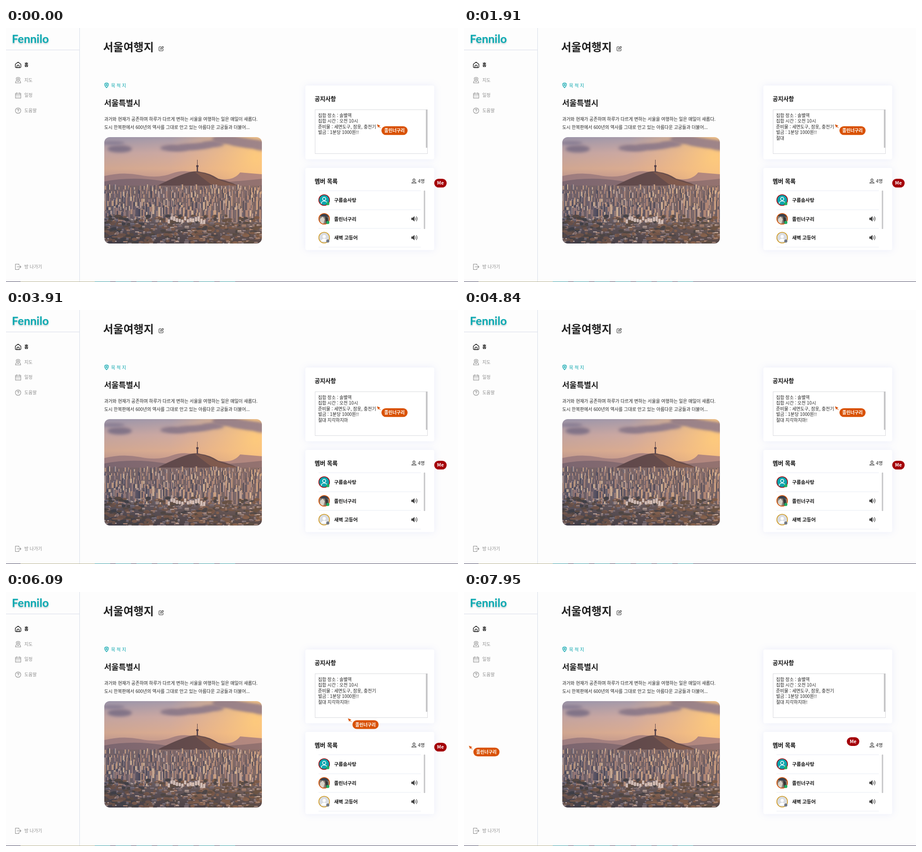
An HTML page with a canvas for the animation above (8 s loop, 998x561 px).

```html
<!DOCTYPE html>
<html lang="ko">
<head>
<meta charset="utf-8">
<style>
  html, body { margin: 0; width: 100%; height: 100%; overflow: hidden; background: #fdfdfd; }
  canvas { position: absolute; left: 217px; top: 241px; border-radius: 12px; }
  svg { position: absolute; left: 0; top: 0; }
  text { font: 9.85px "Noto Sans CJK KR", "Noto Sans CJK", sans-serif; fill: #222; white-space: pre; }
  .nav { font-size: 9.9px; fill: #8c8c8c; font-weight: 500; }
  .head { font-size: 12.8px; font-weight: 700; fill: #111; }
  .name { font-size: 10.65px; font-weight: 700; fill: #111; }
  .tag { font-size: 9.8px; font-weight: 700; fill: #fff; }
  .line { fill: none; stroke: #8c8c8c; stroke-width: 1.1; stroke-linecap: round; stroke-linejoin: round; }
  .card { fill: #fff; filter: drop-shadow(0 0 8px rgba(95, 115, 230, .12)); }
  .bar { fill: #c6c6c8; }
</style>
</head>
<body>
<canvas id="photo" width="348" height="235"></canvas>
<svg width="998" height="561" viewBox="0 0 998 561">
  <defs>
    <g id="person"><circle cy="-2.6" r="3.5"/><path d="M-6.8 8.5C-6.5 0 6.5 0 6.8 8.5"/></g>
    <g id="speaker">
      <path d="M0 -2.5h3L7 -6V6L3 2.5H0Z" fill="#444"/>
      <path class="line" style="stroke:#444" d="M9 -2.5Q11 0 9 2.5M11 -4.8Q15 0 11 4.8"/>
    </g>
    <clipPath id="face"><circle r="11.6"/></clipPath>
  </defs>

  <!-- sidebar -->
  <path d="M162.5 0V560M0 48.5H162" stroke="#d8dde8"/>
  <text x="13" y="32.5" style="font:700 25px Lato,sans-serif;fill:#08a9b1;filter:drop-shadow(0 2px 1.5px rgba(0,80,90,.3))">Fennilo</text>
  <g class="line">
    <path style="stroke:#111;stroke-width:1.3" d="M23.5 87.5h-1.2a1.7 1.7 0 0 1-1.7-1.7V80L26.7 75.3 32.8 80v5.8a1.7 1.7 0 0 1-1.7 1.7H30M24.3 87.5V84.3a2.4 2.4 0 0 1 4.8 0V87.5Z"/>
    <path d="M26.7 118.5C19.5 111.5 23 109 26.7 109S33.9 111.5 26.7 118.5ZM22.5 116.5L20.8 121.3H32.6L31 116.5"/>
    <circle cx="26.7" cy="112.7" r="1.4"/>
    <path d="M21 144.2H32.6V155H21ZM21 147.5H32.6M23.7 142.8V145.3M29.9 142.8V145.3"/>
    <path stroke-dasharray=".2 2.6" d="M23.6 150H31M23.6 152.5H31"/>
    <circle cx="26.7" cy="182.5" r="6"/>
    <path d="M24.9 181C24.9 178.5 28.6 178.6 28.6 180.9 28.6 182.4 26.7 182.2 26.7 183.7M26.7 185.7V185.8"/>
    <path d="M28.5 524V521.5H20.8V533.5H28.5V531M24.5 527.5H33M30.4 524.9L33 527.5 30.4 530.1"/>
  </g>
  <text class="nav" x="40.5" y="85" style="fill:#111;font-weight:700">홈</text>
  <text class="nav" x="40.5" y="118.5">지도</text>
  <text class="nav" x="40.5" y="152.3">일정</text>
  <text class="nav" x="40.5" y="186">도움말</text>
  <text class="nav" x="40.5" y="531">방 나가기</text>

  <!-- destination -->
  <text x="214.5" y="50.6" style="font-size:24.3px;font-weight:700">서울여행지</text>
  <path class="line" style="stroke:#333" d="M342.5 41.5H339a1.2 1.2 0 0 0-1.2 1.2V49.3a1.2 1.2 0 0 0 1.2 1.2H345.6a1.2 1.2 0 0 0 1.2-1.2V46M341.2 47.2L341.6 45 346 40.6 347.8 42.4 343.4 46.8Z"/>
  <g class="line" style="stroke:#08a5ad;stroke-width:1.3">
    <path d="M222 132C215 125 218 121.5 222 121.5S229 125 222 132Z"/><circle cx="222" cy="125.7" r="1.6"/>
  </g>
  <text x="232" y="130.5" style="font-size:10px;font-weight:500;fill:#08a5ad">목 적 지</text>
  <text x="216.8" y="171.6" style="font-size:17.4px;font-weight:700">서울특별시</text>
  <text x="217" y="205.2">과거와 현재가 공존하며 하루가 다르게 변하는 서울을 여행하는 일은 매일이 새롭다.</text>
  <text x="217" y="223.2">도시 한복판에서 600년의 역사를 그대로 안고 있는 아름다운 고궁들과 더불어...</text>

  <!-- notice -->
  <rect class="card" x="661" y="127" width="284.5" height="163" rx="4"/>
  <text class="head" x="681.5" y="160.8">공지사항</text>
  <rect x="682.5" y="180.5" width="248" height="97" fill="#fff" stroke="#d9dade"/>
  <rect class="bar" x="927" y="180" width="3.5" height="84.5"/>
  <text x="689" y="196.8">집합 장소 : 솔별역</text>
  <text x="689" y="209.3">집합 시간 : 오전 10시</text>
  <text x="689" y="221.8">준비물 : 세면도구, 잠옷, 충전기</text>
  <text x="689" y="234.3">벌금 : 1분당 1000원!!</text>
  <text x="689" y="246.8" id="typed"></text>

  <!-- members -->
  <rect class="card" x="661" y="309" width="284.5" height="181.5" rx="4"/>
  <text class="head" x="681.5" y="342.8">멤버 목록</text>
  <g class="line" style="stroke:#333"><circle cx="900.8" cy="335.8" r="2.4"/><path d="M896 342.8C896 339 905.6 339 905.6 342.8Z"/></g>
  <text x="909.5" y="341.8" style="font-size:10.2px">4명</text>
  <path d="M690 359.5H916M690 401.5H916M690 442.5H916M690 484H916" stroke="#e9ecf4"/>
  <rect class="bar" x="922.5" y="359" width="3" height="85" rx="1"/>
  <g transform="translate(702.5 380)">
    <circle r="11.8" fill="#0ba5ae" stroke="#a00008" stroke-width="1.6"/>
    <use href="#person" fill="none" stroke="#fff" stroke-width="1.5"/>
    <circle cx="8" cy="8" r="3.5" fill="#22ad62"/>
  </g>
  <g transform="translate(702.5 421.5)">
    <g clip-path="url(#face)">
      <path d="M-12 -12H12V12H-12Z" fill="#8b8178"/>
      <path d="M-12 -12H12V-4L-12 -6Z" fill="#39424f"/>
      <path d="M-9 0L-3 -5 1 1 -2 12H-9Z" fill="#d9d3c9"/>
      <path d="M2 -5L8 -3 9 6 4 12Z" fill="#373737"/>
    </g>
    <circle r="11.8" fill="none" stroke="#d95204" stroke-width="1.6"/>
    <circle cx="8" cy="8" r="3.5" fill="#22ad62"/>
  </g>
  <g transform="translate(702.5 463)">
    <circle r="11.8" fill="#d9dce1" stroke="#cf981d" stroke-width="1.6"/>
    <use href="#person" fill="#fff"/>
    <circle cx="8" cy="7.5" r="3.5" fill="#737985"/>
  </g>
  <text class="name" x="724.5" y="384.4">구름솜사탕</text>
  <text class="name" x="724.5" y="425.6">졸린너구리</text>
  <text class="name" x="724.5" y="467">새벽 고등어</text>
  <use href="#speaker" x="895" y="421.5"/>
  <use href="#speaker" x="895" y="463"/>

  <!-- bottom edge -->
  <path d="M0 560.5H998" stroke="#4c4964"/>
  <path d="M32 560.5H196" stroke="#b5b08f"/>
  <path d="M196 560.5H510" stroke="#3fa0a8" stroke-dasharray="34 12"/>

  <g id="guest">
    <path d="M0 0L7.6 3 4.9 4.2 8 7.5 7.2 8.3 4.1 5.1 2.9 7.8Z" fill="#d95204"/>
    <rect x="10" y="4.3" width="57.7" height="19.2" rx="9.6" fill="#d95204"/>
    <text class="tag" x="16.3" y="17.6">졸린너구리</text>
  </g>
  <g id="me">
    <rect width="27.5" height="19.2" rx="9.6" fill="#a40008"/>
    <text class="tag" x="13.75" y="13.4" text-anchor="middle" style="font-size:10.3px">Me</text>
  </g>
</svg>

<script>
const $ = id => document.getElementById(id);

function drawPhoto() {
  const c = $('photo').getContext('2d');
  let seed = 7;
  const rnd = (a = 0, b = 1) => {
    seed = (seed * 16807) % 2147483647;
    return a + (b - a) * seed / 2147483647;
  };
  const pick = list => list[Math.floor(rnd(0, list.length))];
  const gradient = (x, y, stops) => {
    const g = c.createLinearGradient(0, 0, x, y);
    stops.forEach(([at, color]) => g.addColorStop(at, color));
    return g;
  };
  const rect = (x, y, w, h, fill) => { c.fillStyle = fill; c.fillRect(x, y, w, h); };
  const blob = (x, y, rx, ry, fill) => {
    c.fillStyle = fill;
    c.beginPath();
    c.ellipse(x, y, rx, ry, 0, 0, 7);
    c.fill();
  };
  const shape = (d, fill) => { c.fillStyle = fill; c.fill(new Path2D(d)); };

  // sky
  rect(0, 0, 348, 235, gradient(0, 100, [[0, '#a9a1b4'], [.35, '#d5b2ab'], [.7, '#e5b598'], [1, '#c69a91']]));
  const glow = c.createRadialGradient(335, 45, 5, 335, 45, 190);
  glow.addColorStop(0, 'rgba(255,208,128,.95)');
  glow.addColorStop(1, 'rgba(255,190,130,0)');
  rect(0, 0, 348, 110, glow);
  c.filter = 'blur(3px)';
  for (let i = 0; i < 9; i++) {
    blob(142 + i * 13, 27 - i * 1.6 + rnd(-3, 3), 18, 6, '#8d7d90');
    blob(258 + i * 13, 3 + i * 2.4 + rnd(-3, 2), 20, 9, '#91808f');
  }
  blob(34, 26, 27, 8, '#88798d');
  blob(20, 13, 25, 4, '#8f8399');
  c.filter = 'none';

  // hills and tower
  shape('M0 86Q40 76 80 84T150 80T230 86T300 78L348 82V130H0Z', '#aa8584');
  shape('M0 98Q60 86 130 97T348 92V140H0Z', '#846b72');
  shape('M108 112Q150 90 180 80Q200 73 213 77Q232 79 252 92Q285 99 310 116Z', '#594448');
  shape('M200 77Q224 78 246 92Q265 100 300 108L238 106Z', '#75534b');
  rect(205, 50, 1, 28, '#4b3c48');
  rect(204, 63, 3, 14, '#51424c');
  rect(203, 62, 5, 4, '#4b3c48');

  // city
  rect(0, 107, 348, 128, gradient(0, 235, [[.45, '#7c6769'], [.72, '#6b6064'], [1, '#3f3a42']]));
  const lit = ['#d9ae8c', '#c59b83', '#b48c7d', '#e2c0a0', '#a18480', '#c7aba0'];
  const shade = ['#565364', '#686474', '#49495b', '#746570'];
  const tower = (x, top, w, h) => {
    rect(x, top, w, h, pick(shade));
    rect(x + w * .45, top, w * .55, h, pick(lit));
    c.globalAlpha = .35;
    for (let y = top + 2; y < top + h; y += 3) rect(x, y, w, 1, '#4d4857');
    c.globalAlpha = 1;
  };
  for (let row = 0; row < 9; row++) {
    const base = 116 + row * 9;
    for (let x = rnd(-6, 0); x < 348; x += rnd(5, 14)) {
      const h = rnd(5, 12 + row * 2.2);
      tower(x, base - h, rnd(4, 6 + row * .8), h);
    }
  }
  // low houses and trees
  for (let i = 0; i < 520; i++) {
    const x = rnd(-5, 348), y = rnd(174, 234);
    if (rnd() < .48) blob(x, y, rnd(3, 9), rnd(2, 4), pick(['#46413f', '#57483f', '#6b5145', '#3c3d43', '#77594a']));
    else {
      const w = rnd(3, 10);
      rect(x, y, w, rnd(2, 5), pick(['#c9b5ab', '#a68e87', '#8a7f88', '#b98e76', '#767484']));
      rect(x, y + 2, w, 1.5, '#5b5159');
    }
  }
  for (let i = 0; i < 14; i++) rect(140 + i * 6, 174 + rnd(0, 9), 5, rnd(6, 12), '#d6c5c0');
  rect(0, 0, 348, 235, gradient(348, 0, [[0, 'rgba(65,65,95,.13)'], [1, 'rgba(255,165,95,.13)']]));
}

const LOOP = 8000;
const phrase = '절대 지각하지마!';
const keyTimes = [1500, 1850, 2050, 2250, 2550, 2850, 3200, 3550, 3950];
const guestPath = [[5250, 819, 212.7], [6000, 755, 279], [6150, 755, 279], [7070, 585.7, 292], [7530, 191, 284], [7740, 75, 292], [7930, 10.7, 339.5]];
const mePath = [[7600, 945.5, 333], [7900, 845.3, 320.7]];

function along(path, t) {
  const i = path.findIndex(p => p[0] > t);
  if (i === 0) return path[0].slice(1);
  if (i < 0) return path[path.length - 1].slice(1);
  const [a, b] = [path[i - 1], path[i]];
  const k = (t - a[0]) / (b[0] - a[0]);
  return [1, 2].map(n => a[n] + (b[n] - a[n]) * k);
}

function render(now) {
  const t = now % LOOP;
  $('typed').textContent = phrase.slice(0, keyTimes.filter(k => k <= t).length);
  $('guest').setAttribute('transform', `translate(${along(guestPath, t)})`);
  $('me').setAttribute('transform', `translate(${along(mePath, t)})`);
  requestAnimationFrame(render);
}

drawPhoto();
render(0);
</script>
</body>
</html>
```
